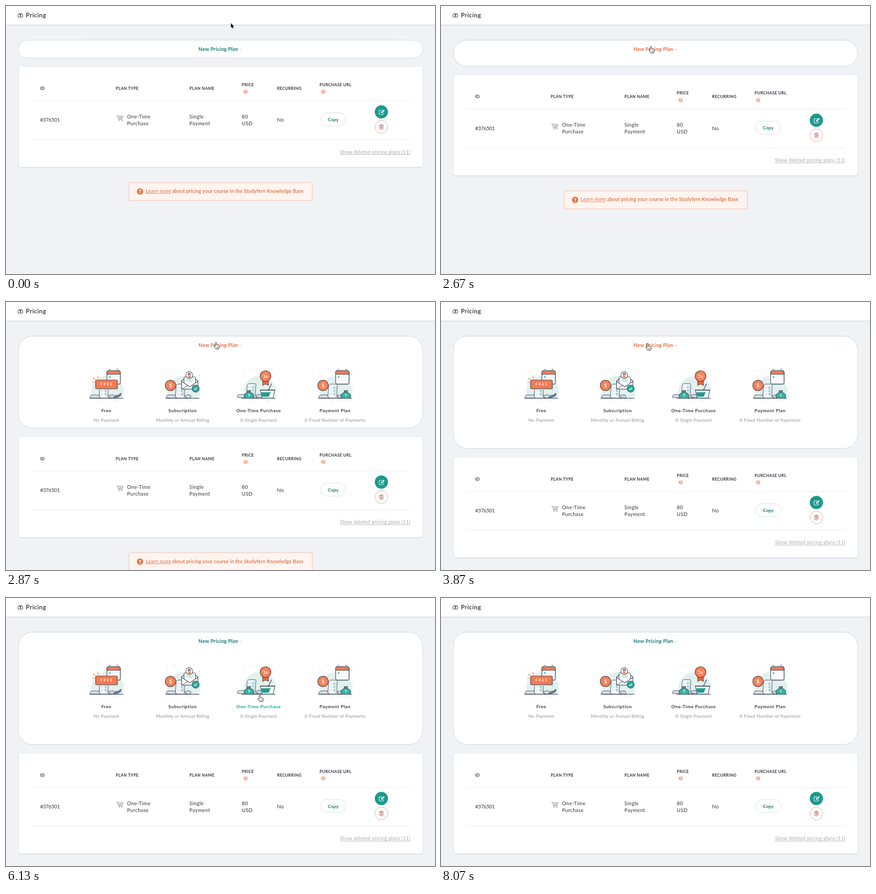
Recreate the animation shown at these times as an HTML page with a canvas. Size 948 px wide and 591 px high, loop 8940 ms.

```html
<!DOCTYPE html>
<html lang="en">
<head>
<meta charset="utf-8">
<title>Pricing</title>
<style>
html, body { margin: 0; width: 100%; height: 100%; overflow: hidden; background: #f1f2f6; }
canvas { display: block; }
</style>
</head>
<body>
<canvas id="stage" width="948" height="591"></canvas>
<script>
const ctx = document.getElementById('stage').getContext('2d');
const LOOP = 8940, TICK = 1000 / 15;
const INK = '#3b4754', TEAL = '#2aa898', DEEP = '#117a70', ORANGE = '#f67a50', HOT = '#ea6b3c',
  PALE = '#cbd5e3', BORDER = '#d4dedb', BODY = '#35353f';

const plans = [
  { x: 221.5, name: 'Free', note: 'No Payment', art: drawFree },
  { x: 390, name: 'Subscription', note: 'Monthly or Annual Billing', art: drawSubscription },
  { x: 558, name: 'One-Time Purchase', note: 'A Single Payment', art: drawOnce },
  { x: 727, name: 'Payment Plan', note: 'A Fixed Number of Payments', art: drawInstalments }
];

// Easing curves
const swing = p => 0.5 - Math.cos(Math.PI * p) / 2;
const easeOut = p => 1 - Math.pow(1 - p, 2.5);
const clamp = p => Math.max(0, Math.min(1, p));

// Pointer moves: first tick, last tick, end point, easing
const moves = [
  { from: 12, to: 25, x: 464, y: 89.5, ease: swing },
  { from: 58, to: 66, x: 232, y: 185, ease: swing },
  { from: 73, to: 79, x: 396, y: 194, ease: easeOut },
  { from: 87, to: 92, x: 561, y: 214.5, ease: swing },
  { from: 102, to: 107, x: 728, y: 212, ease: swing },
  { from: 119, to: 121, x: 900, y: 640, ease: swing }
];

function pointerAt(tick) {
  let x = 497, y = 38;
  for (const m of moves) {
    const p = m.ease(clamp((tick - m.from + 1) / (m.to - m.from + 1)));
    x += (m.x - x) * p;
    y += (m.y - y) * p;
  }
  return { x, y };
}

function openingAt(tick) {
  return tick < 40 ? 0 : 208.6 * swing(clamp((tick - 38.846) / 6));
}

// Drawing helpers
function text(str, x, y, size, color, { weight = 400, gap = 0.4, align = 'left' } = {}) {
  ctx.font = `${weight} ${size}px Lato, sans-serif`;
  ctx.letterSpacing = gap + 'px';
  ctx.textAlign = align;
  ctx.fillStyle = color;
  ctx.fillText(str, x, y);
}

function paint(shape, fill, stroke, width = 1) {
  if (fill) { ctx.fillStyle = fill; ctx.fill(shape); }
  if (stroke) { ctx.strokeStyle = stroke; ctx.lineWidth = width; ctx.stroke(shape); }
}

const path = (d, fill, stroke, width) => paint(new Path2D(d), fill, stroke, width);

function box(x, y, w, h, r, fill, stroke, width) {
  const p = new Path2D();
  p.roundRect(x, y, w, h, r);
  paint(p, fill, stroke, width);
  return p;
}

function disc(x, y, r, fill, stroke, width) {
  const p = new Path2D();
  p.arc(x, y, r, 0, Math.PI * 2);
  paint(p, fill, stroke, width);
}

function at(x, y, draw) {
  ctx.save();
  ctx.translate(x, y);
  draw();
  ctx.restore();
}

function shadow(color, blur, dy) {
  ctx.shadowColor = color;
  ctx.shadowBlur = blur;
  ctx.shadowOffsetY = dy;
}

function help(x, y, r, color) {
  disc(x, y, r, color);
  text('?', x, y + r * 0.58, r * 1.65, '#fff', { weight: 900, gap: 0, align: 'center' });
}

// Illustration parts
function backdrop() {
  path('M-31 32A36 36 0 1 1 36 32Z', '#e3f1ee');
  [[-34, -28], [-17, -32], [24, -33], [38, -18], [-38, 13], [39, 10], [-8, 41], [20, 38]]
    .forEach(([x, y]) => disc(x, y, 0.9, '#bfd0e2'));
}

function ground() {
  path('M-37.5 32.3H37.5', null, INK, 1.2);
}

function paper() {
  path('M4 25Q5 32 12 32H17Q21 28 17 25Q11 23 5 27Z', PALE, INK, 0.9);
  path('M-14 6Q-14 1 -9 1H3Q6 1 5 6L4 25Q4 31 10 32H-12Q-17 31 -15.5 24Z', '#f1f5fa', INK, 1);
  path('M2 3L1 24Q1 29 5 31', null, PALE, 2.2);
  path('M-35 32Q-37 25.5 -31 25H-15Q-18 29 -12 32Z', PALE, INK, 0.9);
  path('M-31 28H-18', null, '#fff', 1.2);
  for (const y of [11, 18, 25]) {
    path(`M-11 ${y - 2}H-6`, null, PALE, 1.1);
    text('$', -2, y, 5.5, TEAL, { weight: 700, gap: 0, align: 'center' });
  }
}

function calendar() {
  box(4, -26, 29, 29, 3, '#cddfe0');
  box(1.5, -28.5, 29.5, 29.5, 3.5, '#fbfdfe', INK, 1.3);
  box(1.5, -28.5, 29.5, 8, [3.5, 3.5, 0, 0], ORANGE, INK, 1.2);
  for (const x of [7.5, 25]) box(x - 1.1, -32, 2.2, 6, 1.1, '#fff', INK, 0.9);
  for (let i = 0; i < 8; i++) {
    disc(8 + i % 4 * 5.4, -14.5 + Math.floor(i / 4) * 7, i ? 0.7 : 1.7, i ? PALE : TEAL);
  }
}

function coin() {
  disc(-26.5, 4, 11.6, ORANGE, INK, 1.2);
  disc(-26.5, 4, 9, '#fa845b');
  text('$', -26.5, 7.7, 10.5, '#fff', { weight: 700, gap: 0, align: 'center' });
}

function bag(x) {
  at(x, 24, () => {
    path('M-2.5 -5L-4 -8.5Q-2 -7.5 0 -9Q2 -7.5 4 -8.5L2.5 -5Q11 -2 11 4Q10.5 8.5 5 8.5H-5Q-10.5 8.5 -11 4Q-11 -2 -2.5 -5Z', '#33b3a1', INK, 1.1);
    path('M-3 -5H3', null, INK, 1);
    text('$', 0, 4.3, 7, '#e9fffb', { weight: 700, gap: 0, align: 'center' });
  });
}

function drawFree() {
  backdrop();
  calendar();
  paper();
  path('M16 31Q20 25 27 25L32 21Q35 24 30 28L23 31Z', '#71829a', INK, 0.9);
  ground();
  path('M-31 -3.5H-26M-28.5 -13L-24.5 -9M-18.5 -16L-17.5 -11', null, ORANGE, 1.5);
  box(-22, -6, 48, 19.5, 2, '#bccfd2');
  box(-23.5, -8, 48, 19, 2, ORANGE, INK, 1.2);
  text('FREE', 1.8, 4, 7.2, '#fff', { weight: 700, gap: 2.9, align: 'center' });
}

function drawSubscription() {
  backdrop();
  paper();
  path('M-2 -6L4 -11H28L34 -6V12H-2Z', '#dbe6ee', INK, 1.1);
  box(3.5, -15, 25, 26, 2, '#fff', INK, 1.1);
  path('M9 -8H23M11 -5H21', null, '#6cc2b7', 1.1);
  path('M-2 -5L16 7L34 -5V12H-2Z', '#fbfdfe', INK, 1.1);
  path('M-2 12L12 4M34 12L20 4', null, INK, 0.9);
  disc(15, -18.5, 7.6, '#fff', INK, 1.2);
  path('M10.5 -14.5Q15 -19 19.5 -14.5Q15 -10.5 10.5 -14.5Z', ORANGE);
  disc(15, -20, 3.2, '#5d4a45');
  disc(15, -18.8, 2.1, '#f3c4a8');
  coin();
  ground();
  disc(29, 11, 8, TEAL, INK, 1);
  path('M25.8 11L28 13.2L32.2 8.8', null, '#fff', 1.6);
}

function drawOnce() {
  backdrop();
  at(-11, -1, paper);
  path('M9 -8V4L15.5 1L22 4V-8Z', '#e56a45', INK, 1);
  disc(15.5, -16.5, 12, ORANGE, INK, 1.2);
  disc(15.5, -16.5, 9.4, '#fa845b');
  text('1x', 15.5, -13.3, 9.5, '#fff', { weight: 700, gap: 0, align: 'center' });
  path('M22 14L29 0', null, INK, 1.6);
  path('M4 14H36L32 32H8Z', '#f4f8fc', INK, 1.1);
  path('M6 19H27L22 29H8Z', TEAL);
  path('M11 20L14 29M18 20L19 29M24 20L22 29M7 24H25', null, '#1d6f69', 0.7);
  path('M3 14.5H37', null, INK, 1.4);
  ground();
  bag(-21);
}

function drawInstalments() {
  backdrop();
  paper();
  calendar();
  coin();
  ground();
  bag(24);
}

// Page sections
function drawHeader() {
  ctx.save();
  shadow('rgba(40,45,60,.16)', 3, 1);
  ctx.fillStyle = '#fff';
  ctx.fillRect(-5, -5, 958, 46);
  ctx.restore();
  box(26.5, 18.2, 10.5, 6.6, 1, '#fff', '#50505a', 1.1);
  path('M27.5 16.4H36', null, '#50505a', 1);
  text('$', 31.8, 24, 6.5, '#30303a', { weight: 900, gap: 0, align: 'center' });
  text('Pricing', 44, 25, 13.5, '#17171d', { weight: 500, gap: 0.6 });
}

function drawPanel(open, hover) {
  const h = 39 + open;
  const shape = box(27.5, 75.3, 893, h, Math.min(h / 2, 30), '#fff', BORDER, 1);
  text('New Pricing Plan', 425.3, 98.6, 11, hover === 'title' ? HOT : DEEP, { weight: 700, gap: 0.28 });
  path('M516.5 94.5L519.3 97.2L522 94.5', null, '#b9c7c5', 1);
  if (!open) return;
  ctx.save();
  ctx.clip(shape);
  for (const plan of plans) {
    at(plan.x, 180, plan.art);
    text(plan.name, plan.x + 0.2, 243.3, 10.2, hover === plan ? '#1b9a8c' : '#3d3d46',
      { weight: 700, gap: 0.55, align: 'center' });
    text(plan.note, plan.x + 0.2, 263.7, 10, '#919196', { gap: 0.26, align: 'center' });
  }
  ctx.restore();
  paint(shape, null, BORDER, 1);
}

function drawCart() {
  const gray = '#77777f';
  path('M244 241.7H246.3L248.8 250H257', null, gray, 0.9);
  path('M247 242.5H258.8L257.3 247.7H248.2', null, gray, 0.8);
  path('M250.8 243.5V247M253.3 243.5V247M255.8 243.5V247', null, gray, 0.8);
  disc(250.3, 252.5, 0.9, null, gray, 0.8);
  disc(256, 252.5, 0.9, null, gray, 0.8);
}

function drawActions() {
  box(695.5, 235.5, 55, 29, 14.5, '#fff', BORDER, 1);
  text('Copy', 723.1, 254, 10, DEEP, { weight: 700, gap: 0.2, align: 'center' });
  disc(829.5, 233.5, 14.6, '#1c9a8d');
  path('M831 230H826Q824.5 230 824.5 231.5V237.7Q824.5 239.2 826 239.2H832.3Q833.8 239.2 833.8 237.7V235.5', null, '#fff', 1.1);
  path('M828.5 236.3L829 233.7L834.3 228.4L836.6 230.7L831.2 236Z', '#fff');
  path('M830.3 234.3L834.2 230.4', null, '#1c9a8d', 0.8);
  disc(829.5, 266.5, 14.1, '#fff', '#dca899', 1);
  path('M824.5 263.5H834.5M827.5 263.5L828.2 261.5H830.8L831.5 263.5', null, '#bd5c43', 1.1);
  path('M825.7 264V270.5Q825.7 271.7 827 271.7H832Q833.3 271.7 833.3 270.5V264M828 265.5V270M829.5 265.5V270M831 265.5V270', null, '#bd5c43', 0.9);
}

function drawTable() {
  ctx.save();
  shadow('rgba(40,50,70,.17)', 3, 1);
  box(28.5, 134, 892, 221, 4, '#fff');
  ctx.restore();
  [['ID', 75.5, 185], ['PLAN TYPE', 242.5, 185], ['PLAN NAME', 405.5, 185], ['PRICE', 521, 177],
   ['RECURRING', 599, 185], ['PURCHASE URL', 693, 177]]
    .forEach(([str, x, y]) => text(str, x, y, 8.8, '#33333d', { weight: 700, gap: 0.45 }));
  help(529.5, 189, 4.6, '#f3ae97');
  help(701, 189, 4.6, '#f3ae97');
  path('M56 209H893M56 294.5H893', null, '#e8e9ec', 1);
  text('#376501', 75.5, 255.3, 11.2, BODY, { gap: -0.3 });
  [['One-Time', 267.5, 248], ['Purchase', 267.5, 263], ['Single', 405.3, 248], ['Payment', 405.3, 263],
   ['80', 521, 248], ['USD', 521, 263], ['No', 599, 255.3]]
    .forEach(([str, x, y]) => text(str, x, y, 11.2, BODY));
  drawCart();
  drawActions();
  text('Show deleted pricing plans (11)', 893.3, 325.7, 10.5, '#a6a6aa', { gap: 0.37, align: 'right' });
  path('M738 327.5H893', null, '#b4b4b8', 1);
}

function drawNotice() {
  box(272, 389.3, 404.7, 39.5, 2, '#fff4ef', '#f5b8a2', 1);
  help(296.2, 409, 7, '#e57848');
  text('Learn more', 309, 412, 10.5, '#d9683f');
  path('M309 413.5H364', null, '#e08a69', 1);
  text('about pricing your course in the Studyfern Knowledge Base', 367, 412, 10.5, '#d9683f',
    { weight: 600, gap: 0.27 });
}

function drawPointer({ x, y }, hand) {
  at(x, y, () => {
    ctx.lineJoin = 'round';
    if (hand) {
      path('M-1.5 8V1Q-1.4 -.4 0 -.4Q1.4 -.4 1.5 1V5.2Q2.7 4.5 3.7 5.6Q5 5 5.7 6.3Q7.4 6 7.6 7.7V10Q7.3 12 6 14H-.3Q-1.2 12 -4.2 8.6Q-4.9 7 -3.3 6.7Q-2.3 7 -1.5 8Z',
        '#fff', '#17171b', 1);
      path('M1.6 9V12M3.3 9V12M5 9V12', null, '#333', 0.7);
    } else {
      path('M0 0V10L2.3 7.9L3.9 11.4L5.6 10.6L4.1 7.2H7.2Z', '#000', '#fff', 1.3);
      path('M0 0V10L2.3 7.9L3.9 11.4L5.6 10.6L4.1 7.2H7.2Z', '#000');
    }
  });
}

function hoverTarget({ x, y }, open) {
  if (y > 86 && y < 105 && x > 424 && x < 524) return 'title';
  if (open && y > 130 && y < 280) return plans.find(p => Math.abs(p.x - x) < 84.2);
}

function frame() {
  const tick = Math.floor((performance.now() % LOOP + 4) / TICK);
  const open = openingAt(tick), pointer = pointerAt(tick);
  const hover = hoverTarget(pointer, open);
  ctx.fillStyle = '#f1f2f6';
  ctx.fillRect(0, 0, 948, 591);
  drawHeader();
  drawPanel(open, hover);
  at(0, open, () => { drawTable(); drawNotice(); });
  drawPointer(pointer, Boolean(hover));
  requestAnimationFrame(frame);
}
frame();
</script>
</body>
</html>
```
